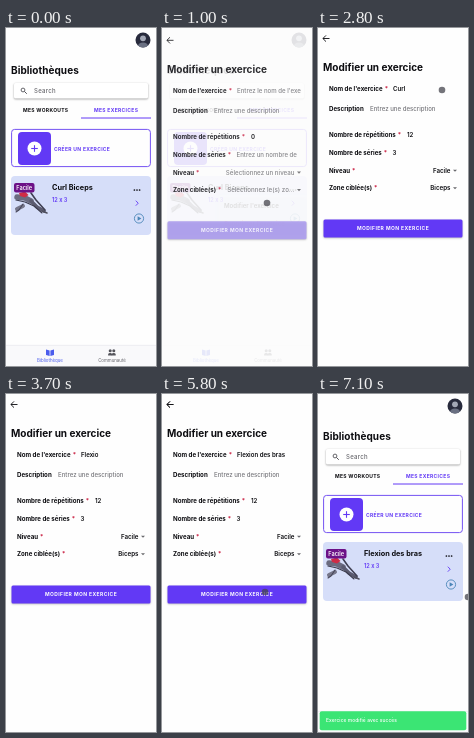
Recreate the animation shown at these times as an HTML page with a canvas. Size 150 by 338 pixels, loop 7.2 s.

```html
<!DOCTYPE html>
<html lang="fr">
<head>
<meta charset="utf-8">
<title>Modifier un exercice</title>
<style>
html, body { margin: 0; width: 100%; height: 100%; overflow: hidden; background: #fff; }
canvas { display: block; width: 150px; height: 338px; }
</style>
</head>
<body>
<canvas id="stage"></canvas>
<script>
const W = 150, H = 338, LOOP = 7200, STEP = 100;
const PURPLE = '#6239f5', INK = '#0c0c10', GREY = '#77777c', RED = '#c8193c';
const canvas = document.getElementById('stage');
const ctx = canvas.getContext('2d');
const dpr = window.devicePixelRatio || 1;
canvas.width = W * dpr;
canvas.height = H * dpr;

const clamp = v => Math.max(0, Math.min(1, v));
const progress = (t, from, to) => clamp((t - from) / (to - from));
const ease = p => p * p * (3 - 2 * p);

function text(str, x, y, size, { color = INK, weight = 700, align = 'left', gap = 0 } = {}) {
  ctx.font = `${weight} ${size}px Inter, sans-serif`;
  ctx.letterSpacing = gap + 'px';
  ctx.textAlign = align;
  ctx.fillStyle = color;
  ctx.fillText(str, x, y);
}

function box(x, y, w, h, r, color) {
  ctx.beginPath();
  ctx.roundRect(x, y, w, h, r);
  ctx.fillStyle = color;
  ctx.fill();
}

function disc(x, y, r, color) {
  ctx.beginPath();
  ctx.arc(x, y, r, 0, Math.PI * 2);
  ctx.fillStyle = color;
  ctx.fill();
}

function trace(points) {
  ctx.beginPath();
  points.forEach(([x, y], i) => i ? ctx.lineTo(x, y) : ctx.moveTo(x, y));
}

function line(points, color, width = 1) {
  trace(points);
  ctx.strokeStyle = color;
  ctx.lineWidth = width;
  ctx.stroke();
}

function shape(points, color) {
  trace(points);
  ctx.fillStyle = color;
  ctx.fill();
}

function shadowed(blur, dy, color, draw) {
  ctx.save();
  ctx.shadowBlur = blur * dpr;
  ctx.shadowOffsetY = dy * dpr;
  ctx.shadowColor = color;
  draw();
  ctx.restore();
}

function layer(alpha, dy, draw) {
  if (alpha <= 0) return;
  ctx.save();
  ctx.globalAlpha = alpha;
  ctx.translate(0, dy);
  draw();
  ctx.restore();
}

function avatar() {
  ctx.save();
  disc(137, 12, 7.5, '#282b3d');
  ctx.clip();
  disc(137, 10.3, 2.9, '#a3a8b6');
  ctx.beginPath();
  ctx.ellipse(137, 19, 5.5, 4.6, 0, 0, Math.PI * 2);
  ctx.fillStyle = '#6a7082';
  ctx.fill();
  ctx.restore();
}

function arm() {
  ctx.save();
  ctx.lineCap = ctx.lineJoin = 'round';
  line([[11, 169], [19, 170], [25, 173]], '#6b6b80', 5.5);
  line([[11, 181], [17, 178]], '#77778b', 4);
  line([[25, 173], [31, 179], [38, 183]], '#5b5b70', 3.6);
  line([[25, 165], [30, 172], [39, 182]], '#3f3f52', 1.6);
  line([[10, 172], [19, 174], [28, 178], [36, 185]], '#3b3b4d', 1.1);
  line([[17, 176], [13, 182], [10, 184]], '#46465a', 1.1);
  line([[36, 183], [41, 185]], '#50505f', 1.6);
  shape([[13, 165], [19, 163.5], [22.5, 167], [19, 169.5], [14, 168]], '#cf2c46');
  ctx.restore();
}

function navigation() {
  box(0, 317, W, 21, 0, '#f9f9fb');
  line([[0, 317.3], [W, 317.3]], '#e5e5e9', .6);
  shape([[40, 321.5], [43.6, 322.5], [43.6, 328], [40, 327]], '#4b5ded');
  shape([[48, 321.5], [44.4, 322.5], [44.4, 328], [48, 327]], '#4b5ded');
  text('Bibliothèque', 44, 333.5, 4.4, { color: '#4b5ded', weight: 400, align: 'center' });
  for (const x of [104.2, 107.8]) {
    disc(x, 322.7, 1.5, '#55555c');
    box(x - 2.1, 325, 4, 2.6, [1.5, 1.5, 0, 0], '#55555c');
  }
  text('Communauté', 106, 333.5, 4.4, { color: '#66666c', weight: 400, align: 'center' });
}

function library(name) {
  box(0, 0, W, H, 0, '#fefefe');
  avatar();
  text('Bibliothèques', 5, 45.7, 10, { gap: .05 });

  shadowed(2, .8, '#0006', () => box(8, 55, 134, 15.5, 1.5, '#fff'));
  ctx.beginPath();
  ctx.arc(17, 62, 1.9, 0, Math.PI * 2);
  ctx.strokeStyle = '#55555b';
  ctx.lineWidth = .9;
  ctx.stroke();
  line([[18.4, 63.4], [20.8, 65.8]], '#55555b', 1);
  text('Search', 28, 65.1, 6, { color: '#66666b', weight: 500, gap: .3 });

  text('MES WORKOUTS', 17, 84, 5, { gap: .3 });
  text('MES EXERCICES', 88, 84, 5, { color: PURPLE, gap: .3 });
  line([[75, 90], [145, 90]], PURPLE, 1);

  ctx.beginPath();
  ctx.roundRect(5.6, 101.4, 138.8, 37.2, 3);
  ctx.strokeStyle = '#7452f2';
  ctx.lineWidth = 1;
  ctx.stroke();
  box(12, 104, 33, 33, 4, PURPLE);
  disc(28.5, 120.5, 7, '#fff');
  line([[25.2, 120.5], [31.8, 120.5]], PURPLE, 1.1);
  line([[28.5, 117.2], [28.5, 123.8]], PURPLE, 1.1);
  text('CRÉER UN EXERCICE', 48, 122.5, 5, { color: PURPLE, gap: .3 });

  box(5, 148, 140, 59, 4, '#d6def9');
  arm();
  box(8, 155, 20.5, 9.5, 2, '#6c1187');
  text('Facile', 18.2, 161.8, 5.6, { color: '#fff', weight: 600, align: 'center' });
  text(name, 46, 161.8, 7.3);
  text('12 x 3', 46, 174, 5.6, { color: PURPLE, weight: 600 });
  for (const x of [128.4, 131, 133.6]) disc(x, 162, .85, INK);
  line([[129.8, 172.7], [132.2, 175.2], [129.8, 177.7]], PURPLE, .9);
  ctx.beginPath();
  ctx.arc(133, 190.5, 4.6, 0, Math.PI * 2);
  ctx.strokeStyle = '#4b86b8';
  ctx.lineWidth = .9;
  ctx.stroke();
  shape([[131.6, 188.2], [135.4, 190.5], [131.6, 192.8]], '#4b86b8');
  navigation();
}

function menuLabels() {
  text("Modifier l'exercice", 62, 180.2, 6.1, { weight: 600 });
  text("Supprimer l'exercice", 62, 197.6, 6.1, { color: RED, weight: 600 });
}

function menuPanel() {
  shadowed(5, 2, '#0006', () => box(56.5, 167, 90.5, 40.5, 2, '#fff'));
}

function backArrow() {
  line([[11.5, 10.5], [5, 10.5]], INK, .9);
  line([[8, 7.4], [4.9, 10.5], [8, 13.6]], INK, .9);
}

function label(str, y, required = true) {
  text(str, 11, y, 6.15);
  if (required) text('*', 13 + ctx.measureText(str).width, y, 6, { color: RED });
}

const hint = (str, x, y) => text(str, x, y, 6.1, { color: GREY, weight: 500 });

function select(value, placeholder, y) {
  text(value || placeholder, 132.5, y, 6.2, { align: 'right', color: value ? INK : GREY, weight: value ? 600 : 500 });
  shape([[135, y - 3], [139, y - 3], [137, y - .9]], '#67676b');
}

function form(name, filled) {
  box(0, -10, W, H + 20, 0, '#fefefe');
  backArrow();
  text('Modifier un exercice', 5, 43, 10);
  label("Nom de l'exercice", 63.2);
  if (name === null) hint("Entrez le nom de l'exe", 75, 63.2);
  else text(name, 75, 63.2, 6.1, { weight: 600 });
  label('Description', 83, false);
  hint('Entrez une description', 52, 83);
  label('Nombre de répétitions', 108.9);
  text(filled ? '12' : '0', 89, 108.9, 6.1, { weight: 600 });
  label('Nombre de séries', 126.8);
  if (filled) text('3', 74.5, 126.8, 6.1, { weight: 600 });
  else hint('Entrez un nombre de', 74.5, 126.8);
  label('Niveau', 144.7);
  select(filled && 'Facile', 'Sélectionnez un niveau', 144.7);
  label('Zone ciblée(s)', 162.2);
  select(filled && 'Biceps', 'Sélectionnez le(s) zo...', 162.2);
  shadowed(2, .7, '#0004', () => box(5.5, 191.5, 139, 18, 1.5, filled ? PURPLE : '#ad9df2'));
  text('MODIFIER MON EXERCICE', 75, 202.4, 5, { color: '#fff', align: 'center', gap: .4 });
}

function toast() {
  box(1.7, 317.3, 146.6, 18.9, 2, '#3be574');
  text('Exercice modifié avec succès', 8, 328.4, 4.9, { color: '#fff', weight: 500, gap: .06 });
}

const OLD_NAME = 'Curl Biceps', NEW_NAME = 'Flexion des bras';

function typedName(t) {
  if (t < 1200) return null;
  if (t < 3200) return OLD_NAME.slice(0, OLD_NAME.length - Math.max(0, Math.floor((t - 2100) / 100)));
  return NEW_NAME.slice(0, Math.floor((t - 3100) / 100));
}

// Pointer waypoints: time, x, y
const PATHS = [
  [[100, 153, 203], [400, 130, 160], [600, 130, 160], [900, 105, 175], [1600, 105, 175], [2000, 124, 62], [3100, 124, 62]],
  [[5000, 124, 62], [5500, 103, 198], [6500, 103, 198], [7100, 150, 203], [7200, 154, 203]]
];

function pointer(t) {
  const path = PATHS.find(p => t >= p[0][0] && t <= p[p.length - 1][0]);
  if (!path) return;
  const i = path.findIndex((p, k) => k && t <= p[0]);
  const [t0, x0, y0] = path[i - 1], [t1, x1, y1] = path[i];
  const p = ease(progress(t, t0, t1));
  disc(x0 + (x1 - x0) * p, y0 + (y1 - y0) * p, 3.3, 'rgba(70,70,78,.75)');
}

function drawOpening(t) {
  const shown = progress(t, 300, 500);
  const opening = progress(t, 900, 1015);
  library(OLD_NAME);
  layer(shown * (1 - opening), 0, () => {
    box(0, 0, W, H, 0, 'rgba(8,0,4,.3)');
    menuPanel();
  });
  layer(shown, 0, menuLabels);
  layer(opening, (1 - opening) * 14, () => form(null, false));
}

function drawClosing(t) {
  const closing = progress(t, 5800, 6108);
  library(NEW_NAME);
  layer(1 - closing, closing * 6, () => form(NEW_NAME, true));
  if (t < 6200) layer(.75, 0, backArrow);
  layer(progress(t, 5900, 6110), 0, toast);
}

function draw(t) {
  ctx.setTransform(dpr, 0, 0, dpr, 0, 0);
  ctx.clearRect(0, 0, W, H);
  if (t < 1100) drawOpening(t);
  else if (t < 5800) form(typedName(t), t >= 1200);
  else drawClosing(t);
  pointer(t);
}

function tick(now) {
  draw(Math.floor((now % LOOP) / STEP) * STEP);
  requestAnimationFrame(tick);
}
requestAnimationFrame(tick);
</script>
</body>
</html>
```
